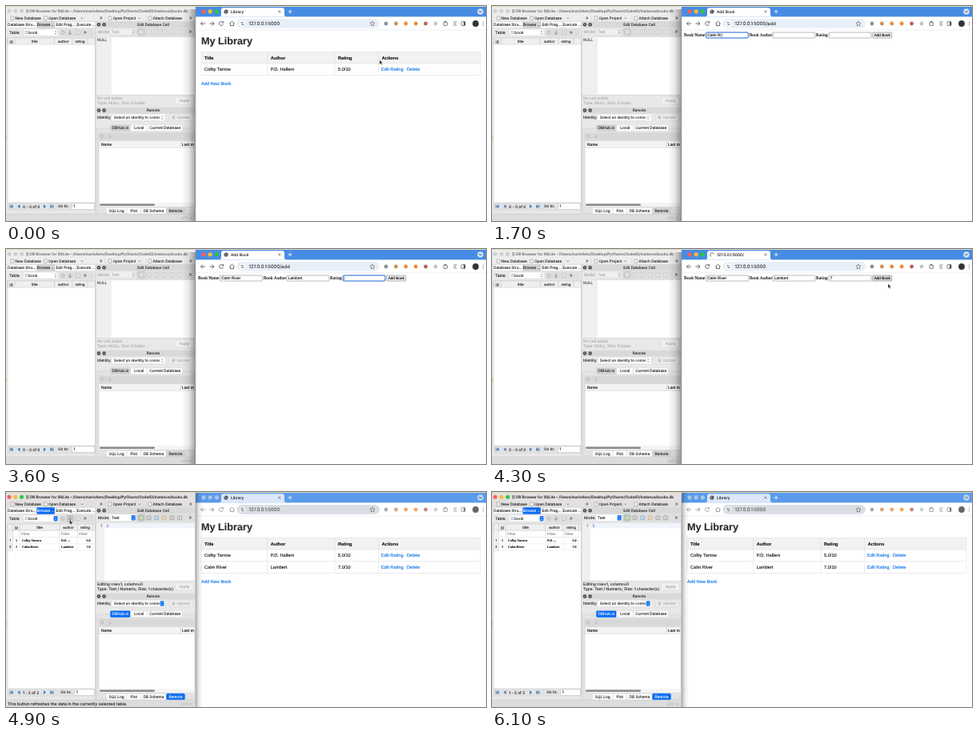
These frames come from a looping animation (600 px wide and 269 px high, 6200 ms). An HTML page:

```html
<!DOCTYPE html>
<html lang="en">
<head>
<meta charset="utf-8">
<title>Library demo</title>
<style>
html, body { margin: 0; width: 100%; height: 100%; overflow: hidden; background: #fff; }
svg { display: block; width: 600px; height: 269px; }
text { white-space: pre; text-rendering: geometricPrecision; stroke-width: .12px; }
</style>
</head>
<body>
<svg id="stage" viewBox="0 0 600 269" xmlns="http://www.w3.org/2000/svg"></svg>
<script>
const LOOP = 6200, STEP = 100;
const UI = "Inter, 'Liberation Sans', sans-serif";
const SANS = "'Liberation Sans', Arial, sans-serif";
const SERIF = "'Liberation Serif', Times, serif";
const BLUE = "#0a6cf5", LINK = "#0b74e8", INK = "#222", DIM = "#a9a9a9", LINE = "#c6c6c6";
const BOOKS = [
  { title: "Colby Tarrow", author: "P.D. Hallern", cut: "P.D. ...", rating: "5.0" },
  { title: "Calm River", author: "Lambert", cut: "Lambert", rating: "7.0" }
];
const stage = document.getElementById("stage");

// Shape helpers; y of text is its vertical centre
const text = (x, y, s, size = 4.9, fill = INK, font = UI, weight = 400, anchor = "start") =>
  `<text x="${x}" y="${y + size * 0.36}" font-size="${size}" fill="${fill}" stroke="${fill}" font-family="${font}" font-weight="${weight}" text-anchor="${anchor}">${s}</text>`;
const mid = (x, y, s, size, fill, font, weight) => text(x, y, s, size, fill, font, weight, "middle");
const rect = (x, y, w, h, fill, stroke = "none", r = 0, sw = 0.5) =>
  `<rect x="${x}" y="${y}" width="${w}" height="${h}" rx="${r}" fill="${fill}" stroke="${stroke}" stroke-width="${sw}"/>`;
const dot = (x, y, r, fill, stroke = "none", sw = 0.6) =>
  `<circle cx="${x}" cy="${y}" r="${r}" fill="${fill}" stroke="${stroke}" stroke-width="${sw}"/>`;
const line = (d, stroke = LINE, sw = 0.5, fill = "none") =>
  `<path d="${d}" stroke="${stroke}" stroke-width="${sw}" fill="${fill}"/>`;
const fade = (id, a, b) =>
  `<linearGradient id="${id}"><stop offset="0" stop-opacity="${a}"/><stop offset=".5" stop-opacity="${(a + b) / 4}"/><stop offset="1" stop-opacity="${b}"/></linearGradient>`;
const DEFS = `<defs>${fade("toLeft", 0, 0.36)}${fade("toRight", 0.3, 0)}</defs>`;

// Time helpers
const typed = (t, keys) => keys.reduce((s, [at, n]) => (t >= at ? n : s), 0);
const ease = p => p * p * (3 - 2 * p);
function along(t, keys) {
  for (let i = 1; i < keys.length; i++) {
    const [a, x0, y0] = keys[i - 1], [b, x1, y1] = keys[i];
    if (t <= b) {
      const p = ease(Math.max(0, (t - a) / (b - a)));
      return [x0 + (x1 - x0) * p, y0 + (y1 - y0) * p];
    }
  }
  return keys[keys.length - 1].slice(1);
}

const stepper = (x, y, on) =>
  (on ? rect(x, y + 0.9, 4.8, 6.4, BLUE, "none", 1.3) : "") +
  line(`M${x + 1.3} ${y + 3.3}l1.1 -1.2l1.1 1.2M${x + 1.3} ${y + 4.9}l1.1 1.2l1.1 -1.2`, on ? "#fff" : "#555", 0.6);

const toolIcon = (x, y, color) =>
  rect(x - 2.4, y - 2.4, 4.8, 4.8, "#f5f5f5", color, 0.6, 0.6) +
  line(`M${x - 1.3} ${y - 0.8}h2.6M${x - 1.3} ${y + 0.9}h2.6`, color, 0.6);

const dockBar = (y, name) =>
  rect(112, y, 125, 7.5, "#d9d9d9") +
  [116, 122.7].map(x => dot(x, y + 3.8, 2.3, "#444") +
    line(`M${x - 0.9} ${y + 2.9}l1.8 1.8m0 -1.8l-1.8 1.8`, "#eee", 0.5)).join("") +
  mid(184, y + 3.8, name, 4.6);

function tab(x, y, w, name, sel, on) {
  const fill = sel ? (on ? BLUE : "#d2d2d2") : "#fbfbfb";
  return rect(x, y, w, 8, fill, sel && on ? BLUE : "#cfcfcf", 1.4, 0.4) +
    mid(x + w / 2, y + 4.1, name, 4.7, sel && on ? "#fff" : INK);
}

function grid(full) {
  const dx = full ? 6.3 : 0;
  const cols = [2, 11, 60.5, 83, 102].map(x => x + dx);
  let s = rect(2, 40, 109.5, 206, "#fff", LINE) + rect(2, 40, 109.5, 8, "#efefef", LINE);
  s += line(cols.map(x => `M${x} 40v8`).join(""), "#bbb");
  ["id", "title", "author", "rating"].forEach((h, i) => {
    s += mid((cols[i] + cols[i + 1]) / 2, 44.2, h, 4.5);
  });
  s += line(`M${cols[0] + 2.4} 46.7h4.4`, INK, 0.4);
  if (!full) return s;
  s += rect(2, 48, 6.3, 25.5, "#f2f2f2", "#d0d0d0", 0, 0.4);
  cols.slice(0, 4).forEach((x, i) => {
    s += rect(x + 0.3, 48.5, cols[i + 1] - x - 0.6, 8, "#fff", "#cfcfcf", 0, 0.4);
    if (i) s += text(x + 2, 52.7, "Filter", 4.5, "#888");
  });
  BOOKS.forEach((b, i) => {
    const y = 60.7 + i * 8.2, cell = (x, v, a) => text(x, y, v, 4.1, "#111", SERIF, 700, a);
    s += line(`M2 ${y + 4.1}H${cols[4]}` + cols.map(x => `M${x} ${y - 4.1}v8.2`).join(""), "#ddd", 0.4);
    s += mid(5.2, y, i + 1, 4.2) + cell(14, i + 1, "end") + cell(20, b.title) +
      cell(69, b.cut) + cell(105.5, b.rating, "end");
  });
  return s;
}

function database(t) {
  const on = t >= 4700, full = t >= 4800, hover = t >= 4800 && t < 5300;
  let s = rect(0, 0, 237, 269, "#e8e8e8");
  // title and main toolbar
  s += rect(0, 1.2, 237, 18.2, on ? "#e3e0df" : "#ededed");
  ["#fb5f57", "#fdbc2e", "#28c840"].forEach((c, i) => { s += dot(4 + i * 7.8, 6.2, 2.5, on ? c : "#cfcfcf"); });
  s += rect(25, 4, 3.6, 4.6, on ? "#8b9a9a" : "#b5b5b5");
  s += text(30, 6.3, "DB Browser for SQLite - /Users/marlofenn/Desktop/PyCharm/Code63/instance/books.db",
    4.58, on ? "#333" : "#777", UI, 600);
  [[11.5, "New Database"], [53, "Open Database"], [133.5, "Open Project"], [183.5, "Attach Database"]].forEach(([x, name]) => {
    s += rect(x - 5.5, 13, 3.8, 4.4, "#f8f8f8", "#777", 0.5) + text(x, 15.2, name, 4.7);
  });
  s += line("M93.5 14.5l1.4 1.5l1.4 -1.5M165.5 14.5l1.4 1.5l1.4 -1.5", "#555", 0.6);
  s += text(117, 14.6, "»", 6.5, "#555") + text(229, 14.6, "»", 6.5, "#555");
  s += line("M124 12v6M175 12v6M0 19.3H237", "#c8c8c8");

  // left panel
  s += tab(1, 19.5, 37.5, "Database Stru...") + tab(38.5, 19.5, 22.5, "Browse ...", true, on) +
    tab(61, 19.5, 27, "Edit Prag...") + tab(88, 19.5, 24, "Execute ...");
  s += text(4, 33.2, "Table:", 4.8) + rect(21.5, 29, 43.5, 8.3, "#fff", "#ccc", 1.5) +
    rect(24, 31.4, 3, 3.5, "#dceafa", "#7795b5", 0, 0.4) + text(28, 33.2, "book", 4.9) + stepper(59.6, 29.1, on);
  s += rect(67, 28.5, 43, 9.5, "#dedede");
  if (hover) s += rect(76, 29, 8.5, 8.5, "#c9c9c9", "#b5b5b5", 1);
  s += dot(71, 33.2, 2, "none", "#aaa", 0.8) + line("M80 30.5v5M78 33.5l2 2l2 -2", "#888", 0.9) +
    toolIcon(90, 33.2, "#aaa") + text(97, 32.6, "»", 6.5, "#555");
  s += grid(full);
  s += rect(2, 246.2, 109.5, 9, "#e2e2e2", "#d0d0d0", 0, 0.4);
  const arrow = (x, d, bar) => line(`M${x} 248.3v5l${3 * d} -2.5z`, "none", 0, "#3d77bd") +
    (bar ? line(`M${x + 3.4 * d} 248.3v5`, "#3d77bd", 0.8) : "");
  s += arrow(8.5, -1, 1) + arrow(17.5, -1) + arrow(47, 1) + arrow(55.5, 1, 1);
  const shift = full ? 3.3 : 0;
  s += text(21, 250.8, full ? "1 - 2 of 2" : "0 - 0 of 0", 4.8) + text(65 + shift, 250.8, "Go to:", 4.7);
  s += rect(82.5 + shift, 247, 28 - shift, 7.6, "#fff", "#bbb") + text(84.5 + shift, 250.8, "1", 4.7);
  s += line("M112 19.5V260", "#bdbdbd");

  // cell editor
  const ink = full ? INK : DIM;
  s += dockBar(19.5, "Edit Database Cell");
  s += text(115, 32.3, "Mode:", 4.8, ink) + rect(129.5, 28, 32.5, 8.4, full ? "#fff" : "#efefef", "#ccc", 1.5) +
    text(132, 32.3, "Text", 4.8, ink) + stepper(156.8, 28.2, full);
  s += rect(163, 27.2, 74, 10.3, "#dedede") + rect(164.8, 28, 8.6, 8.6, full ? "#c8c8c8" : "#d4d4d4", "#bbb", 1);
  ["#6b9a58", "#777", "#4d87c2", "#b8903c", "#777", "#777"].forEach((c, i) => {
    s += toolIcon(169 + i * 9.6, 32.3, full ? c : "#b5b5b5");
  });
  s += text(228.5, 31.7, "»", 6.5, "#555");
  s += rect(112.5, 38.3, 124, 73, "#fff", LINE);
  if (full) {
    s += rect(113, 38.6, 10, 72.4, "#f0f0f0") + rect(123, 38.8, 113, 6.4, "#f1f3fa") +
      text(118.5, 42.1, "1", 4.6, "#666") + text(125.5, 42.1, "1", 4.8, "#2352c8", "'Noto Sans Mono', monospace");
  } else {
    s += rect(113, 38.6, 18, 72.4, "#efefef") + line("M131.3 38.5V111", "#ddd") + text(114, 42.3, "NULL", 4.6, "#444");
  }
  s += text(114, 115.2, full ? "Editing row=1, column=0" : "No cell active", 4.9, ink);
  s += text(114, 120.8, full ? "Type: Text / Numeric; Size: 1 character(s)" : "Type: NULL; Size: 0 bytes", 4.9, ink);
  s += rect(211.5, 114, 23, 9, "#f0f0f0", "#d5d5d5", 1.5) + mid(223, 118.6, "Apply", 4.8, DIM);

  // remote panel
  s += dockBar(126.8, "Remote");
  s += text(114, 139.6, "Identity", 4.7) + rect(132, 135.2, 67, 8.6, "#fff", "#ccc", 1.5) +
    text(135, 139.6, "Select an identity to conne", 4.6) + rect(192, 135.5, 6.8, 8, "#fff", "none", 1.5) + stepper(192.8, 135.4, on);
  s += rect(204, 135.2, 29.5, 8.6, "#ededed", "#d3d3d3", 1.5) + rect(207.5, 137.5, 3.8, 4, "#c6c6c6") +
    text(213.5, 139.6, "Upload", 4.8, DIM);
  s += rect(113, 153, 123, 106, "#e3e3e3", "#d0d0d0");
  s += tab(130.5, 148.7, 25, "DBHub.io", true, on) + tab(155.5, 148.7, 21.5, "Local") + tab(177, 148.7, 43.5, "Current Database");
  s += rect(115.5, 158.5, 120, 9, "#d8d8d8") + dot(120, 163, 1.9, "none", "#bbb", 0.9) +
    line("M130 160.8v4.4M128 163.4l2 1.8l2 -1.8", "#bbb", 0.9);
  s += rect(116, 168.6, 120, 82.5, "#fff", LINE) + rect(116, 168.6, 120, 8.6, "#f3f3f3", "#d0d0d0") +
    text(119, 173, "Name", 4.7, INK, UI, 500) + text(220, 173, "Last m", 4.7, INK, UI, 500) + line("M218.3 169v8", "#bbb");
  s += rect(116.2, 246.3, 119.5, 4.8, "#f4f4f4") + rect(117, 247.5, 69, 2.4, "#888", "none", 1.2);
  s += tab(125.5, 252.2, 25.5, "SQL Log") + tab(151, 252.2, 17.5, "Plot") + tab(168.5, 252.2, 32, "DB Schema") +
    tab(200.5, 252.2, 23, "Remote", true, on);

  // status bar
  s += rect(0, 260.2, 237, 8.8, "#dcdcdc") + line("M0 260.2H237", "#c5c5c5");
  if (hover) s += text(2, 264.8, "This button refreshes the data in the currently selected table.", 5.2);
  return s + text(219, 265, "UTF-8", 4.5, "#b5b5b5") + rect(0, 162, 0.8, 5, "#e4c65e");
}

function chrome(t, title, url, busy) {
  const back = t >= 4700, gray = back ? "#8a8a8a" : "#444";
  let s = rect(237, 0, 363, 269, "#fff") + rect(237, 0, 363, 14, back ? "#5a9bec" : "#468ce4");
  ["#fb5f57", "#fdbc2e", "#28c840"].forEach((c, i) => { s += dot(247 + i * 8.2, 6.8, 2.6, back ? "#a8c4e8" : c); });
  s += `<path d="M266 13.4q3 0 3 -3V5q0 -2.7 2.7 -2.7h73.6q2.7 0 2.7 2.7v5.4q0 3 3 3z" fill="${back ? "#dbe8fa" : "#fff"}"/>`;
  if (busy) {
    const a = t / 1000 * 2 * Math.PI, r = 2.3;
    const at = k => `${275 + r * Math.cos(a + k)} ${7 + r * Math.sin(a + k)}`;
    s += line(`M${at(0)}A${r} ${r} 0 1 1 ${at(4.2)}`, "#555", 0.8);
  } else {
    s += dot(275, 7, 2.6, "#46494d") + line("M273 5.7l1.7 .4l.3 1.4l-1.5 .6M276 8.7l1.2 -1.3", "#ddd", 0.6);
  }
  s += text(281, 7, title, 4.9) + line("M340.4 5.5l3 3m0 -3l-3 3", "#444", 0.6) + line("M352.6 7h5M355.1 4.5v5", "#fff", 0.8);
  s += dot(593, 7, 3.8, back ? "#b9d4f5" : "#cfe0f7") + line("M591.3 6.2l1.7 1.7l1.7 -1.7", "#333", 0.8);

  s += rect(237, 13.4, 363, 16.6, "#fff") + line("M237 29.8H600", "#dde3ea");
  s += line("M249 22h-5.5m2.5 -2.5l-2.5 2.5l2.5 2.5M254.5 22h5.5m-2.5 -2.5l2.5 2.5l-2.5 2.5", gray, 0.8);
  s += line("M271.3 20.6a2.5 2.5 0 1 0 .2 2.2M271.7 19v2h-2M279.5 21.8l3 -2.6l3 2.6M280.4 21.3v3.3h4.2v-3.3", gray, 0.8);
  s += rect(288.5, 16, 178.5, 11.8, back ? "#dadee4" : "#e9eff8", "none", 5.9) + dot(295.5, 22, 3.8, back ? "#eceef1" : "#fff") +
    line("M293.7 20.8h3.6M293.7 23.2h3.6", "#555", 0.6) + dot(294.7, 20.8, 0.7, "#555") + dot(296.3, 23.2, 0.7, "#555");
  s += text(303.5, 22, url, 5.9, back ? "#555" : "#333");
  s += line("M458 19l.9 1.9l2.1 .3l-1.5 1.5l.3 2.1l-1.8 -1l-1.8 1l.3 -2.1l-1.5 -1.5l2.1 -.3z", "#555", 0.6);
  s += `<g opacity="${back ? 0.75 : 1}">`;
  ["#8a9298", "#c98f55", "#e88d34", "#f08a28", "#b5605a", "#c4c4c4"].forEach((c, i) => { s += dot(475 + i * 12.4, 22, 2.4, c); });
  s += rect(547, 20, 4.4, 4.4, "none", "#555", 0.6, 0.8) + dot(549.2, 19.7, 0.9, "#555");
  s += line("M559.5 20h4M559.5 22h3M559.5 24h4", "#555", 0.7) + rect(569, 19.6, 5, 4.8, "none", "#555", 0.6, 0.7) + rect(572, 19.6, 2, 4.8, "#555");
  s += dot(587, 22, 3.9, "#30343a") + [20, 22, 24].map(y => dot(596.5, y, 0.55, "#555")).join("");
  return s + "</g>";
}

function library(n) {
  const top = 57.4, h = 14.7, end = top + h * (n + 1), cols = [244, 326.7, 411, 465.7, 593];
  let s = text(244, 43.3, "My Library", 12.65, "#2b2b2b", SANS, 700);
  s += rect(244, top, 349, h, "#f2f2f2");
  for (let i = 0; i <= n + 1; i++) s += line(`M244 ${top + i * h}H593`, "#d9d9d9");
  s += line(cols.map(x => `M${x} ${top}V${end}`).join(""), "#d9d9d9");
  ["Title", "Author", "Rating", "Actions"].forEach((v, i) => { s += text(cols[i] + 4, 65, v, 5.65, "#111", SANS, 700); });
  BOOKS.slice(0, n).forEach((b, i) => {
    const y = 79.4 + i * h;
    [b.title, b.author, b.rating + "/10"].forEach((v, k) => { s += text(cols[k] + 4, y, v, 5.65, "#111", SANS); });
    s += text(469, y, "Edit Rating", 5.65, LINK, SANS) + text(501, y, "Delete", 5.65, LINK, SANS);
  });
  return s + text(244, end + 10.3, "Add New Book", 5.65, LINK, SANS);
}

function form(t) {
  const focus = t < 800 ? -1 : t < 2000 ? 0 : t < 3400 ? 1 : t < 4100 ? 2 : -1;
  const vals = [
    BOOKS[1].title.slice(0, typed(t, [[1000, 2], [1200, 3], [1300, 4], [1400, 5], [1600, 6], [1700, 7], [1800, 8], [1900, 10]])),
    BOOKS[1].author.slice(0, typed(t, [[2200, 1], [2300, 2], [2400, 3], [2600, 4], [2800, 5], [3000, 6], [3100, 7]])),
    "7".slice(0, typed(t, [[3700, 1]]))
  ];
  const em = [0.53, 0.52, 0.556];
  const label = (x, s) => text(x, 36.1, s, 5.5, "#000", SERIF);
  let s = label(240, "Book Name") + label(321.7, "Book Author") + label(405, "Rating");
  [267.7, 351.2, 421.3].forEach((x, i) => {
    const on = i === focus;
    s += rect(x, 33, 52.6, 7, "#fff", on ? "#1a66d6" : "#858585", on ? 1 : 0.3, on ? 1 : 0.55);
    s += text(x + 1.5, 36.5, vals[i], 4.85, "#111", SANS);
    if (on) s += line(`M${x + 1.9 + vals[i].length * em[i] * 4.85} 34.2v4.8`, "#222", 0.45);
  });
  return s + rect(475.7, 33, 24.1, 7, t >= 4000 ? "#dcdcdc" : "#efefef", "#777", 1, 0.55) +
    mid(487.7, 36.5, "Add Book", 4.65, "#000", SANS);
}

const arrowAt = (x, y) =>
  `<path transform="translate(${x} ${y})" d="M0 0v5.4l1.3 -1.2l.9 2l.9 -.4l-.9 -1.9h1.7z" fill="#111" stroke="#fff" stroke-width=".4"/>`;
const beamAt = (x, y) => line(`M${x - 1} ${y - 2.8}l1 .5l1 -.5M${x} ${y - 2.4}v4.8M${x - 1} ${y + 2.8}l1 -.5l1 .5`, "#333", 0.55);
const handAt = (x, y) =>
  `<path transform="translate(${x} ${y})" d="M-.5 0h1v2.5l2 .5v2l-.7 1.5h-2.6l-1.6 -2.3l.7 -.5l1.2 .9z" fill="#fff" stroke="#111" stroke-width=".4"/>`;

function pointer(t) {
  if (t < 1000) {
    const [x, y] = along(t, [[0, 467, 67.5], [300, 262, 96], [500, 262, 96], [800, 285, 37]]);
    if (t >= 300 && t < 500) return handAt(x, y);
    return t >= 800 ? beamAt(x, y) : arrowAt(x, y);
  }
  if (t < 3700 || t >= 5700) return "";
  return arrowAt(...along(t, [[3700, 462, 62], [4000, 494, 41], [4300, 495, 43.5], [4400, 495, 43.5],
    [4700, 79.5, 35], [5100, 79.5, 35], [5700, 92, 270]]));
}

function draw(t) {
  const adding = t >= 500 && t < 4400, busy = adding && t >= 4100;
  const title = busy ? "127.0.0.1:5000/" : adding ? "Add Book" : "Library";
  const url = "127.0.0.1:5000" + (adding && !busy ? "/add" : "");
  // the front window casts its shadow on the other one
  const shadow = t < 4700 ? rect(220, 4, 17, 265, "url(#toLeft)") : rect(237, 0, 9, 269, "url(#toRight)");
  stage.innerHTML = DEFS + database(t) + chrome(t, title, url, busy) +
    (adding ? form(t) : library(t < 500 ? 1 : 2)) + shadow +
    rect(0, 0, 600, 1, "#e0d8b4") + line("M236.9 1V269", "#9b9b9b", 0.6) + pointer(t);
}

let last = -1;
const start = performance.now();
function tick() {
  const t = Math.floor(((performance.now() - start) % LOOP) / STEP) * STEP;
  if (t !== last) draw(last = t);
  requestAnimationFrame(tick);
}
tick();
</script>
</body>
</html>
```
